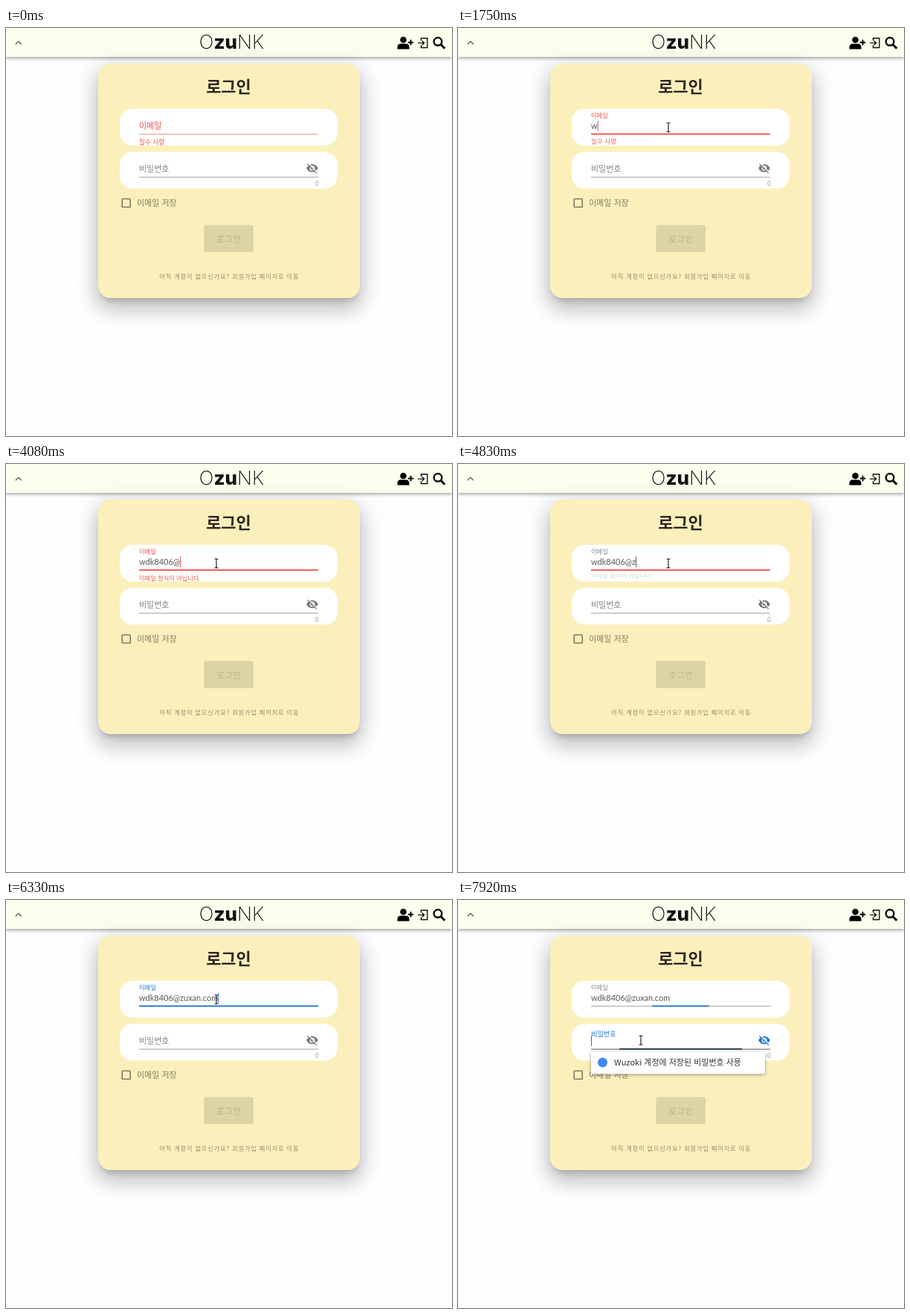
These frames come from a looping animation (600 px wide and 550 px high, 8 s). An HTML page:

```html
<!DOCTYPE html>
<html lang="ko">
<head>
<meta charset="utf-8">
<title>로그인</title>
<style>
html, body { margin: 0; width: 100%; height: 100%; overflow: hidden; background: #fefdff; }
body { position: relative; }
div, svg { position: absolute; }
#bar {
  left: 0; top: 0; width: 100%; height: 39px; background: #fdffee;
  box-shadow: 0 1.5px 3px -.7px #0003, 0 3px 3.5px #00000024, 0 .7px 7px #0000001f;
}
#card {
  left: 124px; top: 48px; width: 352px; height: 316px; border-radius: 16.5px; background: #fbf0bc;
  box-shadow: 0 7.5px 10px -5px #0003, 0 16.5px 26px 2px #00000024, 0 6px 32px 5.5px #0000001f;
}
svg { left: 0; top: 0; }
text { font: 300 11px "Noto Sans CJK KR", "Noto Sans CJK", sans-serif; fill: #777; white-space: pre; }
.small { font-size: 8.25px; }
.wide { letter-spacing: .8px; }
#email { font: 400 11px Lato, sans-serif; fill: #585858; }
#logo { font: 200 26px Inter, Lato, sans-serif; fill: #111; }
#logo tspan { font-weight: 800; }
.shade { filter: drop-shadow(0 1.5px 2px #0006); }
</style>
</head>
<body>
<div id="bar"></div>
<div id="card"></div>
<svg width="600" height="550" viewBox="0 0 600 550">
  <defs><clipPath id="msgArea"><rect x="170" y="149" width="260" height="12"/></clipPath></defs>

  <path d="M12.8 22L16.8 18L20.8 22" fill="none" stroke="#555" stroke-width="1.2"/>
  <text id="logo" x="303.5" y="28" text-anchor="middle">O<tspan>zu</tspan>NK</text>
  <circle cx="534.5" cy="16" r="4.3"/>
  <path d="M526.5 28.5V26Q526.5 21.2 531 21.2H538Q542.5 21.2 542.5 26V28.5Z"/>
  <path d="M540.8 19.5H548.2M544.5 15.8V23.2" stroke="#000" stroke-width="1.9"/>
  <g fill="none" stroke="#111">
    <path d="M558.5 17V13.7H566.8V26.5H558.5V23.2M554 20.1H562.5M559.6 17.2L562.6 20.1L559.6 23" stroke-width="1.4"/>
    <circle cx="581" cy="18.3" r="5.3" stroke-width="2.5"/>
    <path d="M585 22.3L590.3 27.6" stroke-width="3"/>
  </g>

  <text x="299.5" y="87" text-anchor="middle" style="font-size:22px;font-weight:700;fill:#2b2620">로그인</text>
  <rect x="153" y="109" width="293" height="49.5" rx="17" fill="#fff"/>
  <rect x="153" y="167" width="293" height="49.5" rx="17" fill="#fff"/>

  <rect id="base1" x="179" y="142.7" width="241" height=".8"/>
  <rect id="focus1" y="142.1" height="1.6"/>
  <rect id="base2" x="179" y="200.7" width="241" height=".8"/>
  <rect id="focus2" y="200.1" height="1.5" fill="#10243f"/>
  <text id="label1" x="179">이메일</text>
  <text id="label2" x="179">비밀번호</text>
  <text id="email" x="179" y="136"></text>
  <path id="squiggle" fill="none" stroke="#e53935" stroke-width=".8"/>
  <g clip-path="url(#msgArea)">
    <text id="msg1" x="179" fill="#e8503f" style="font-size:8.6px;fill:#ea5848">필수 사항</text>
    <text id="msg2" x="179" class="small">이메일 형식이 아닙니다.</text>
  </g>
  <text x="420.5" y="213" text-anchor="end" class="small" style="fill:#999">0</text>
  <g id="eye" transform="translate(403.6 180.6) scale(.7)">
    <path fill-rule="evenodd" d="M1 12C2.7 7.6 7 4.5 12 4.5S21.3 7.6 23 12C21.3 16.4 17 19.5 12 19.5S2.7 16.4 1 12ZM7 12A5 5 0 0 0 17 12A5 5 0 0 0 7 12Z"/>
    <circle cx="12" cy="12" r="3"/>
    <path d="M3.9 2.3L21.7 20.1" stroke="#fff" stroke-width="1.9"/>
    <path id="slash" d="M2.6 3.6L20.4 21.4" stroke-width="1.8"/>
  </g>

  <rect x="156.2" y="230.4" width="11" height="11" rx=".8" fill="none" stroke="#6d6752" stroke-width="1.4"/>
  <text x="176" y="240" style="fill:#837c60">이메일 저장</text>
  <rect x="266.3" y="265.5" width="66.7" height="36.7" rx="2.75" fill="#ddd4a6"/>
  <text x="300" y="288.5" text-anchor="middle" class="wide" style="fill:#bab18a">로그인</text>
  <text x="300.3" y="338" text-anchor="middle" class="small wide" style="fill:#948c6c">아직 계정이 없으신가요? 회원가입 페이지로 이동</text>

  <g id="popup">
    <rect class="shade" x="179" y="204.5" width="234" height="30" rx="2" fill="#fff"/>
    <circle cx="194.5" cy="219" r="6.5" fill="#4285f4"/>
    <text x="210" y="223" style="font-weight:400;fill:#333">Wuzoki 계정에 저장된 비밀번호 사용</text>
  </g>
  <rect id="caret" width="1" height="14"/>
  <path id="mouse" d="M-2.5 -6H-.8L0 -5.3L.8 -6H2.5M0 -5.3V5.3M-2.5 6H-.8L0 5.3L.8 6H2.5" fill="none" stroke="#111" stroke-width="1.1"/>
</svg>
<script>
const LOOP = 8000, FRAME = 1000 / 12, BLINK = 530;
const FOCUS = 590, VALID = 4740, BLUE = 4900, SPELL = 7200, SWITCH = 7825, POPUP = 7900;
const RED = '#f4504a', GRAY = '#858585', PRIMARY = '#1976d2';
const ADDRESS = 'wdk8406@zuxan.com';
// [time, characters typed so far]
const KEYS = [[1740, 1], [1825, 2], [1880, 3], [2825, 4], [3075, 5], [3333, 7], [4045, 8], [4740, 9],
  [4910, 10], [4990, 11], [5075, 12], [5240, 13], [5300, 14], [5900, 15], [6240, 16], [6320, 17]];

const el = {};
document.querySelectorAll('[id]').forEach(e => el[e.id] = e);
const set = (id, attrs) => { for (const k in attrs) el[id].setAttribute(k, attrs[k]); };
const show = (id, on) => { el[id].style.display = on ? '' : 'none'; };
const mix = (a, b, p) => a + (b - a) * p;
const clamp = x => Math.min(1, Math.max(0, x));

// cubic-bezier(.25, .8, .5, 1)
function ease(x) {
  let lo = 0, hi = 1;
  const curve = (s, a, b) => 3 * a * s * (1 - s) ** 2 + 3 * b * s * s * (1 - s) + s ** 3;
  for (let i = 0; i < 20; i++) {
    const s = (lo + hi) / 2;
    if (curve(s, .25, .5) < x) lo = s; else hi = s;
  }
  return curve(hi, .8, 1);
}
const since = (t, start) => t < start ? 0 : t > start + 300 ? 1 : ease((t - start) / 300);

function label(id, y, p, color) {
  set(id, { y: mix(y, y - 15, p) });
  el[id].style.fontSize = mix(11, 8.25, p) + 'px';
  el[id].style.fill = color;
}
function focusLine(id, p) {
  set(id, { x: 299.5 - 120.5 * p, width: 241 * p });
}
function message(id, shown) {
  set(id, { y: 156.6 - 5.5 * (1 - shown), opacity: shown });
}
function zigzag(from, to) {
  let d = `M${from} 139`;
  for (let x = from + 1.4, i = 0; x < to; x += 1.4, i++) d += `L${x} ${i % 2 ? 139 : 137.8}`;
  return d;
}
function pointer(t) {
  const [x0, y0, x1, y1, start, length] = t < 2000 ? [310, 210, 283, 134, 80, 430] : [283, 134, 246, 189, 7100, 560];
  const u = clamp((t - start) / length), p = u * u * (3 - 2 * u);
  return [mix(x0, x1, p), mix(y0, y1, p)];
}

function render(t) {
  let typed = 0, stamp = FOCUS;
  for (const [time, n] of KEYS) if (t >= time) { typed = n; stamp = time; }
  const second = t >= SWITCH;
  if (second) stamp = SWITCH;
  const tone = t < VALID ? RED : t < BLUE ? GRAY : second ? GRAY : PRIMARY;

  el.email.textContent = ADDRESS.slice(0, typed);
  label('label1', 136, since(t, FOCUS), tone);
  label('label2', 194, since(t, SWITCH), second ? PRIMARY : GRAY);
  focusLine('focus1', since(t, FOCUS) - since(t, SWITCH));
  focusLine('focus2', since(t, SWITCH));
  set('focus1', { fill: t < BLUE ? RED : PRIMARY });
  set('base1', { fill: t < BLUE ? '#e0705f' : GRAY });

  const swap = since(t, KEYS[0][0]);
  message('msg1', 1 - swap);
  message('msg2', swap - since(t, VALID));
  el.msg2.style.fill = t < VALID ? '#ea5848' : '#4a6484';

  const [mx, my] = pointer(t);
  show('mouse', t >= 80);
  set('mouse', { transform: `translate(${mx} ${my})` });
  set('base2', { fill: t >= 80 && my > 167 ? '#333' : GRAY });
  set('eye', { fill: second ? PRIMARY : '#757575' });
  set('slash', { stroke: second ? PRIMARY : '#757575' });

  const end = 179 + (typed ? el.email.getComputedTextLength() : 0);
  show('caret', t >= FOCUS && Math.floor((t - stamp) / BLINK) % 2 === 0);
  set('caret', { x: second ? 179 : end, y: second ? 183 : 125, fill: t >= VALID && t < BLUE ? '#555' : t < VALID ? RED : PRIMARY });

  const wavy = t >= SPELL && !second;
  show('squiggle', wavy);
  if (wavy) {
    const width = n => 179 + el.email.getSubStringLength(0, n);
    set('squiggle', { d: zigzag(179, width(7)) + zigzag(width(8), end) });
  }
  show('popup', t >= POPUP);
}

const began = performance.now();
function tick() {
  const t = (performance.now() - began) % LOOP;
  render(Math.floor((t + 6) / FRAME) * FRAME);
  requestAnimationFrame(tick);
}
tick();
</script>
</body>
</html>
```
